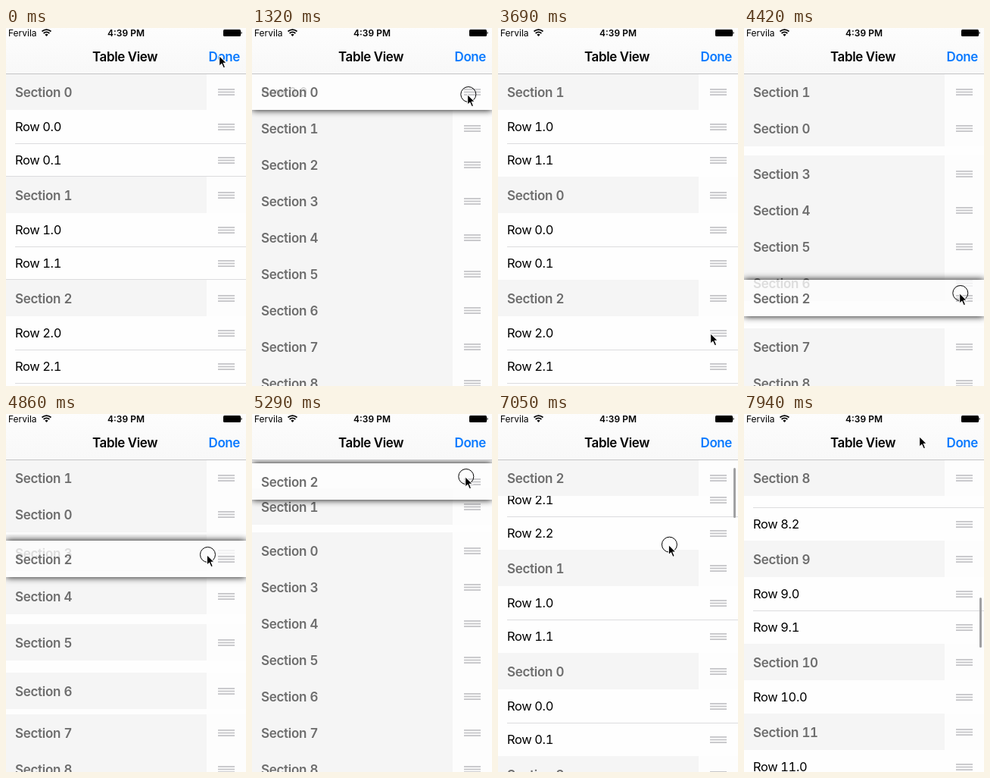
Recreate the animation shown at these times as an HTML page. Size 317 px wide and 472 px high, loop 8000 ms.

```html
<!DOCTYPE html>
<html lang="en">
<head>
<meta charset="utf-8">
<title>Table View</title>
<style>
  html, body { margin: 0; width: 100%; height: 100%; overflow: hidden; background: #fefefe; }
  #stage { position: relative; width: 317px; height: 472px; overflow: hidden; background: #fefefe;
    font: 17px/1 Inter, Roboto, sans-serif; color: #000; }
  #stage * { box-sizing: border-box; }
  .cell { position: absolute; left: 0; width: 317px; white-space: pre; padding-left: 12px;
    font-variant-numeric: tabular-nums; }
  .cell::after { content: ""; position: absolute; left: 280px; top: 50%; width: 22px; height: 9px; margin-top: -4px;
    background: linear-gradient(#c6c6c9 1.5px, transparent 1.5px) 0 0 / 100% 3.6px; }
  .row { height: 44px; line-height: 44px; font-size: 16.5px; letter-spacing: -.4px; background: #fefefe; z-index: 1; }
  .row::before { content: ""; position: absolute; left: 12px; right: 0; top: 0; height: 1px; background: #dcdcde; }
  .row.first::before { display: none; }
  .head { height: 48px; line-height: 51px; font-weight: 600; letter-spacing: -.3px; color: #6d6d6d; z-index: 2;
    background: linear-gradient(90deg, #f5f5f5 265px, #fdfdfd 265px); }
  .intro .head { box-shadow: 0 -1px #dcdcde; }
  .head.held { z-index: 3; background: rgba(253, 253, 253, .78); box-shadow: 0 0 9px #000; }
  .head.settling { color: #8a8a8a; background: #f7f7f7; }
  #nav { position: absolute; z-index: 5; left: 0; top: 0; width: 317px; height: 61px;
    background: linear-gradient(#fdfdfd, #f8f8f8); border-bottom: 1px solid #c4c4c6; }
  #nav span { position: absolute; white-space: pre; font-weight: 600; }
  #nav .bar { top: 28px; line-height: 20px; letter-spacing: -.4px; }
  #nav .status { top: 0; font-size: 12px; line-height: 13px; }
  #thumb { position: absolute; z-index: 4; left: 311px; width: 3px; height: 66px; border-radius: 2px; background: #a0a0a2; }
  svg { position: absolute; overflow: visible; }
  #pointer { z-index: 6; left: 0; top: 0; width: 1px; height: 1px; }
</style>
</head>
<body>
<div id="stage">
  <div id="nav">
    <span class="status" style="left:3px;font-weight:400">Fervila</span>
    <span class="status" style="left:0;width:317px;text-align:center">4:39 PM</span>
    <svg width="317" height="14" style="left:0;top:0">
      <path d="M47.5 4.5Q53.5 -.3 59.5 4.5M49.6 7Q53.5 3.8 57.4 7" fill="none" stroke="#000" stroke-width="1.7"/>
      <path d="M51.4 8.7Q53.5 7 55.6 8.7L53.5 11Z"/>
      <rect x="287" y="2" width="23" height="9" rx="1.5"/>
      <path d="M310.5 4.6q2.4 1.9 0 3.8z"/>
    </svg>
    <span class="bar" style="left:0;width:314px;text-align:center">Table View</span>
    <span class="bar" style="right:8px;color:#0a7aff">Done</span>
  </div>
  <div id="thumb"></div>
  <svg id="pointer">
    <circle id="ring" cx="1.8" cy=".5" r="10" fill="none" stroke="#000"/>
    <path d="M0 0V14.5L3.4 11.4L6 17.2L8.5 16.1L6 10.4H10.6Z" transform="translate(.7 .7) scale(.93)"
      fill="#000" stroke="#fff" stroke-width="1.1"/>
  </svg>
</div>
<script>
const LOOP = 8000, STEP = 146.9;
const TOP = 60, HEAD = 48, ROW = 44, SECTIONS = 12;
const FOLD = 300, SETTLE = 150, SWAP = 350;
const FLICK = 6950;

// Stops of the pointer; each move eases from one to the next, bowing sideways on the way
const stops = [
  { t: 150, x: 281, y: 36 },
  { t: 800, x: 284, y: 87 },
  { t: 1320, x: 284, y: 87 },
  { t: 1900, x: 284, y: 203 },
  { t: 2360, x: 284, y: 135 },
  { t: 3180, x: 284, y: 135 },
  { t: 3670, x: 280, y: 402 },
  { t: 4050, x: 284, y: 349 },
  { t: 4490, x: 284, y: 349 },
  { t: 5110, x: 281, y: 82, bow: -18 },
  { t: 6610, x: 281, y: 82 },
  { t: 6940, x: 222, y: 231 },
  { t: 7250, x: 231, y: 29 }
];
const presses = [[1020, 2440], [4050, 5950], [6940, 7280]];
const drags = [
  { id: 0, from: 0, to: 1, start: 1095, drop: 2480, grab: -3 },
  { id: 2, from: 2, to: 0, start: 4150, drop: 6010, grab: 6.5 }
];

const $ = id => document.getElementById(id);
const stage = $("stage");
const clamp = v => Math.min(1, Math.max(0, v));
const mix = (a, b, k) => a + (b - a) * k;
const smooth = k => k * k * (3 - 2 * k);

function pointerAt(t) {
  const i = stops.findIndex(p => p.t > t);
  if (i === 0) return stops[0];
  if (i < 0) return stops[stops.length - 1];
  const a = stops[i - 1], b = stops[i];
  const u = (t - a.t) / (b.t - a.t), k = smooth(u);
  return {
    x: mix(a.x, b.x, k) + (b.bow || 0) * Math.sin(Math.PI * u),
    y: mix(a.y, b.y, k)
  };
}

// Speeds up from rest towards a steady glide
function scrollAt(t) {
  const s = Math.max(0, t - FLICK);
  return 1.3267 * s * s / (s + 120.8);
}

function addCell(kind, text) {
  const el = document.createElement("div");
  el.className = "cell " + kind;
  el.textContent = text;
  stage.append(el);
  return el;
}

function makeSection(_, id) {
  const count = 2 + (id % 6 === 2) - (id % 6 === 4);
  const rows = [];
  // Later rows lie underneath, so the first stays visible while folding
  for (let r = count - 1; r >= 0; r--) {
    rows[r] = addCell(r ? "row" : "row first", `Row ${id}.${r}`);
  }
  return { id, count, rows, el: addCell("head", "Section " + id) };
}
const sections = Array.from({ length: SECTIONS }, makeSection);

function orderAt(t) {
  const order = sections.slice();
  for (const d of drags) {
    if (t >= d.drop) order.splice(d.to, 0, order.splice(d.from, 1)[0]);
  }
  return order;
}

// How far the rows are open (position) and how visible they are
function foldAt(t) {
  let open = 1, alpha = 1;
  for (const d of drags) {
    if (t < d.drop) {
      const shut = clamp((t - d.start) / FOLD);
      open *= (1 - shut) ** 6;
      alpha *= 1 - shut ** 4;
    } else {
      const back = clamp((t - d.drop - SETTLE) / FOLD);
      open *= 1 - (1 - back) ** 3;
      alpha *= back;
    }
  }
  return { open, alpha };
}

const heldTop = (d, t) => Math.max(TOP, pointerAt(t).y + d.grab - HEAD / 2);
const heldSlot = (d, t) => t < d.start ? d.from : Math.round((heldTop(d, t) - TOP) / HEAD);

// Share of the recent past in which the held cell was at or above a slot
function pushed(d, slot, t) {
  const n = 35;
  let hits = 0;
  for (let k = 0; k < n; k++) {
    if (heldSlot(d, t - (k + .5) * SWAP / n) <= slot) hits++;
  }
  return hits / n;
}

function draw(t) {
  const order = orderAt(t);
  const { open, alpha } = foldAt(t);
  const scroll = scrollAt(t);
  const drag = drags.find(d => t >= d.start && t < d.drop);
  const settling = drags.find(d => t >= d.drop && t < d.drop + SETTLE);

  let full = TOP, slot = 0;
  const tops = order.map((s, i) => {
    const expanded = full;
    full += HEAD + ROW * s.count;
    if (drag && s.id === drag.id) return heldTop(drag, t);
    const folded = drag ? slot + pushed(drag, slot, t) : i;
    slot++;
    return mix(TOP + HEAD * folded, expanded, open) - scroll;
  });

  order.forEach((s, i) => {
    const next = i + 1 < tops.length ? tops[i + 1] : Infinity;
    let y = tops[i];
    if (scroll > 0) y = Math.max(y, Math.min(TOP, next - HEAD));
    const dropped = !!settling && s.id === settling.id;
    const held = dropped || (!!drag && s.id === drag.id);
    s.el.style.top = Math.round(y) + "px";
    s.el.classList.toggle("held", held);
    s.el.classList.toggle("settling", dropped);
    s.rows.forEach((el, r) => {
      el.style.top = Math.round(tops[i] + mix(2, HEAD + ROW * r, open)) + "px";
      el.style.opacity = alpha;
    });
  });

  const { x, y } = pointerAt(t);
  stage.classList.toggle("intro", t < drags[0].start);
  $("thumb").style.top = 62 + scroll * .155 + "px";
  $("thumb").style.opacity = scroll > 0 ? 1 : 0;
  $("pointer").style.transform = `translate(${x}px, ${y}px)`;
  $("ring").style.opacity = presses.some(([a, b]) => t >= a && t < b) ? 1 : 0;
}

const begin = performance.now();
function tick() {
  const ms = (performance.now() - begin) % LOOP;
  draw(Math.floor((ms + 8) / STEP) * STEP);
  requestAnimationFrame(tick);
}
tick();
</script>
</body>
</html>
```
